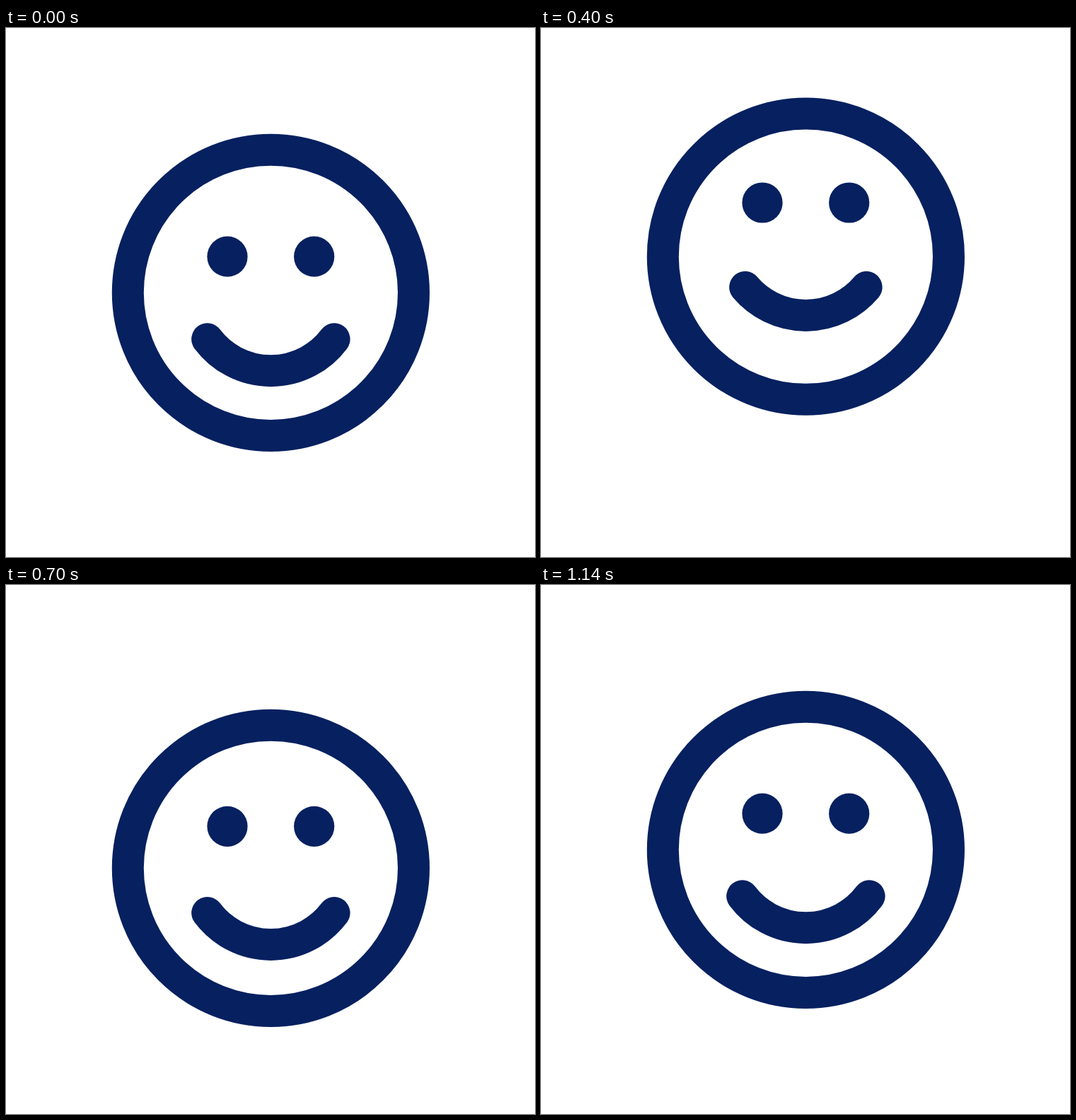
An HTML page for the animation above (1200 ms loop, 748 by 748 pixels).

```html
<!DOCTYPE html>
<html lang="en">
<head>
<meta charset="utf-8">
<title>Jumping smiley</title>
<style>
  html, body { margin: 0; width: 100%; height: 100%; overflow: hidden; background: #fff; }
  svg { display: block; width: 100%; height: 100%; }
  .line { fill: none; stroke: #062060; stroke-width: 45; stroke-linecap: round; }
  .eye { fill: #062060; }
</style>
</head>
<body>
<svg viewBox="0 0 748 748">
  <ellipse id="ring" class="line" cx="374.4"/>
  <ellipse class="eye" cx="313" rx="28.6"/>
  <ellipse class="eye" cx="435.7" rx="28.6"/>
  <path id="mouth" class="line"/>
</svg>
<script>
  const LOOP = 1200, STEP = 20;
  const MID = 374.4, RING_R = 202.1, EYE_R = 28.6, SMILE_R = 112.2;
  const CROUCH = 100, JUMP = 200, FALL = 496;

  const ring = document.getElementById('ring');
  const mouth = document.getElementById('mouth');
  const eyes = document.querySelectorAll('.eye');

  // Smooth 0 to 1 between two times.
  function ease(t, from, to) {
    const p = Math.min(1, Math.max(0, (t - from) / (to - from)));
    return p * p * (3 - 2 * p);
  }

  // Rises to 1 during the crouch and returns to 0 by the time given.
  const squeeze = (t, end) => ease(t, CROUCH, JUMP) - ease(t, JUMP, end);

  // Height of a part over the hop; a larger lag lands and settles later.
  function hop(t, { rest, low, top, land, rise, lag }) {
    const landed = 690 + 42 * lag, settled = 965 + 175 * lag;
    return rest
      + (low - rest) * ease(t, CROUCH, JUMP)
      + (top - low) * ease(t, JUMP, rise)
      + (land - top) * ease(t, FALL, landed)
      + (rest - land) * ease(t, landed, settled);
  }

  const ringHop = { rest: 374.3, low: 416, top: 323.2, land: 400.4, rise: 332, lag: 0 };
  const mouthHop = { rest: 484.7, low: 511.6, top: 398, land: 508.6, rise: 440, lag: 0.35 };
  const eyeHop = { rest: 323.2, low: 369.7, top: 237.2, land: 346.8, rise: 440, lag: 1 };

  function set(node, attrs) {
    for (const name in attrs) node.setAttribute(name, attrs[name]);
  }

  function draw(t) {
    const snap = squeeze(t, ringHop.rise);
    set(ring, {
      cy: hop(t, ringHop),
      rx: RING_R + 11.5 * snap,
      ry: RING_R - 11.5 * snap
    });

    for (const eye of eyes) {
      set(eye, { cy: hop(t, eyeHop), ry: EYE_R * (1 - 0.99 * snap) });
    }

    // The smile is an arc of fixed radius that shortens in the crouch.
    const angle = (53.1 - 31.1 * squeeze(t, 450)) * Math.PI / 180;
    const dx = SMILE_R * Math.sin(angle);
    const y = hop(t, mouthHop) - SMILE_R * (1 - Math.cos(angle));
    set(mouth, {
      d: `M${MID - dx} ${y}A${SMILE_R} ${SMILE_R} 0 0 0 ${MID + dx} ${y}`
    });
  }

  const start = performance.now();
  function tick() {
    const t = (performance.now() - start) % LOOP;
    draw(Math.floor(t / STEP) * STEP);
    requestAnimationFrame(tick);
  }
  tick();
</script>
</body>
</html>
```
